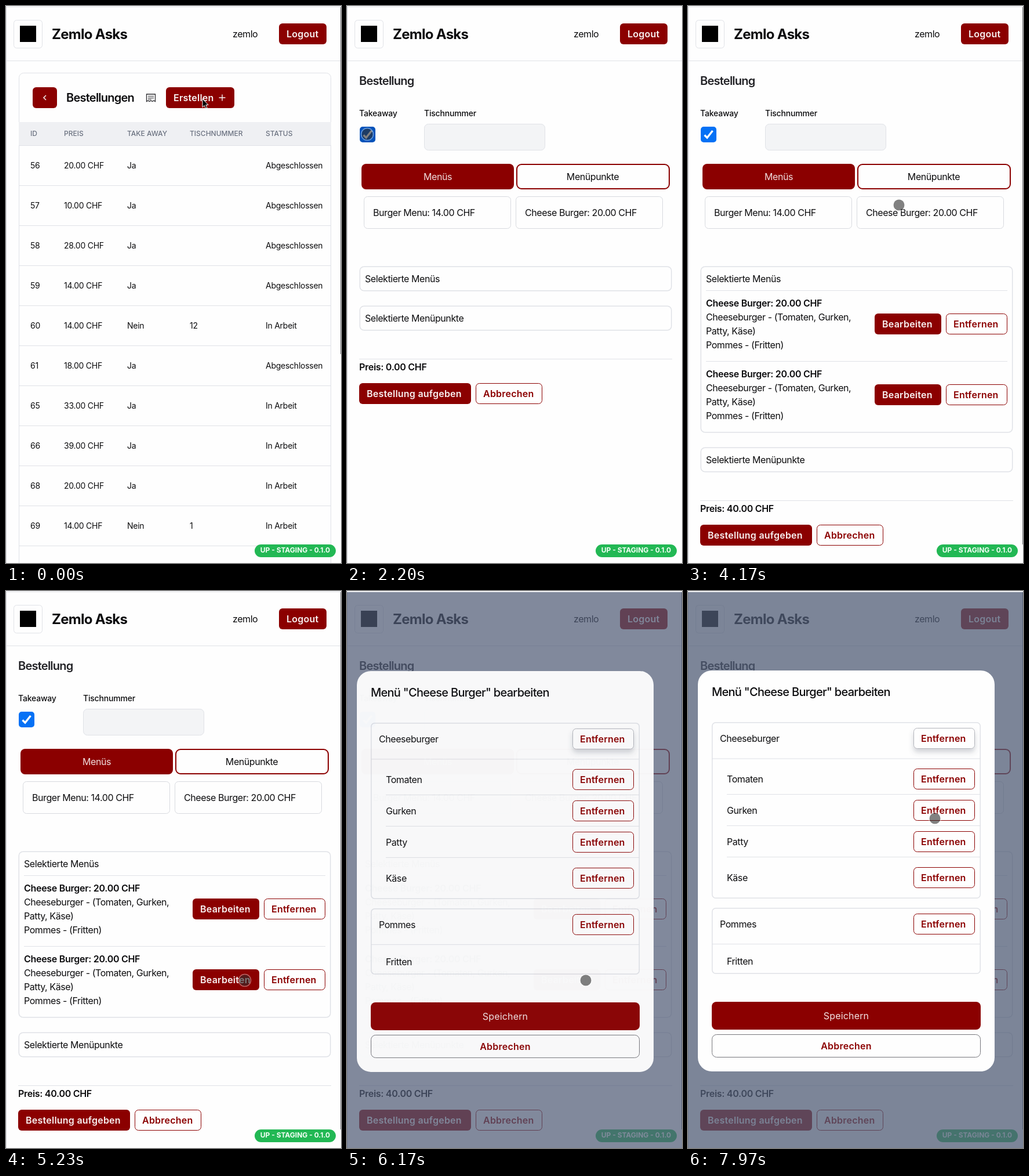
Animation, 578 px wide and 960 px high, one loop 8000 ms. Source, as an HTML page:

```html
<!DOCTYPE html>
<html lang="de">
<head>
<meta charset="utf-8">
<title>Bestellung</title>
<style>
  html, body { margin: 0; width: 100%; height: 100%; overflow: hidden; background: #fefefe; }
  svg { display: block; width: 100vw; height: 100vh; }
  text { font: 400 16px Inter, sans-serif; letter-spacing: -.027em; fill: #0c0c0e; }
  .strong { font-weight: 600; letter-spacing: -.018em; }
  .button { font-weight: 600; letter-spacing: .015em; }
  .brand { font-size: 24px; font-weight: 700; letter-spacing: -.03em; }
  .title { font-size: 20px; font-weight: 600; letter-spacing: -.038em; }
  .dialog { font-size: 20px; font-weight: 500; letter-spacing: -.036em; }
  .label { font-size: 14px; font-weight: 500; letter-spacing: -.014em; }
  .cell { font-size: 14px; letter-spacing: -.018em; }
  .head { font-size: 12px; font-weight: 500; letter-spacing: 0; fill: #6b7280; }
  .badge { font-size: 12px; font-weight: 700; letter-spacing: 0; }
  .save { letter-spacing: .01em; }
</style>
</head>
<body>
<svg id="stage" viewBox="0 0 578 960" preserveAspectRatio="none"></svg>
<script>
const LOOP = 8000;
const RED = '#8b0000', PAGE = '#fefefe', LINE = '#e0e2e7', EDGE = '#d8dadf', PALE = '#f8f2f2';

// Building blocks; boxes are given by their outer edges.
const text = (x, y, str, cls = '', fill = '', anchor = 'start') =>
  `<text x="${x}" y="${y}" class="${cls}" text-anchor="${anchor}"${fill && ` style="fill:${fill}"`}>${str}</text>`;
const box = (x, y, w, h, r, fill, stroke = 'none', sw = 1, extra = '') => {
  const d = stroke === 'none' ? 0 : sw / 2;
  return `<rect x="${x + d}" y="${y + d}" width="${w - 2 * d}" height="${h - 2 * d}" rx="${r}" fill="${fill}" stroke="${stroke}" stroke-width="${sw}" ${extra}/>`;
};
const rule = (x, y, w) => box(x, y, w, 1, 0, LINE);
const path = (d, stroke, width, extra = '') =>
  `<path d="${d}" fill="none" stroke="${stroke}" stroke-width="${width}" ${extra}/>`;
const group = (id, body) => `<g id="${id}">${body}</g>`;
const solidButton = (x, y, w, str) => box(x, y, w, 36, 6, RED) + text(x + 13, y + 24, str, 'button', PALE);
const outlineButton = (x, y, w, str, stroke = RED, extra = '') =>
  box(x, y, w, 36, 6, PAGE, stroke, 1, extra) + text(x + 13, y + 24, str, 'button', RED);

const header = () =>
  rule(0, 1, 578) + box(0, 1, 1, 959, 0, EDGE) + rule(0, 94, 578) +
  box(13, 24, 50, 49, 5, PAGE, LINE) + box(24, 34, 28, 28, 0, '#000') +
  text(79, 57, 'Zemlo Asks', 'brand') + text(391, 54, 'zemlo') + solidButton(471, 30, 82, 'Logout');

const orders = [
  [56, 20], [57, 10], [58, 28], [59, 14], [60, 14, 12],
  [61, 18], [65, 33], [66, 39], [68, 20], [69, 14, 1]
];

const orderRow = ([id, price, table], i) => {
  const y = 280 + 69 * i;
  const done = id < 62 && !table;
  return text(42, y, id, 'cell') + text(100, y, price + '.00 CHF', 'cell') +
    text(209, y, table ? 'Nein' : 'Ja', 'cell') + text(317, y, table || '', 'cell') +
    text(448, y, done ? 'Abgeschlossen' : 'In Arbeit', 'cell') + rule(22, y + 29, 539);
};

const receipt = () =>
  path('M242.5 152H257.5V164.5L255 163L252.5 164.5L250 163L247.5 164.5L245 163L242.5 164.5Z', '#2c2c30', 1.3) +
  path('M245 155.5H255M245 158.5H255M245 161H251', '#2c2c30', 1);

const list = () =>
  box(22, 115, 539, 860, 8, PAGE, LINE) +
  box(46, 140, 42, 36, 6, RED) + path('M69 154L65 158L69 162', PALE, 1.5) +
  text(104, 165, 'Bestellungen', 'title') + receipt() +
  solidButton(276, 140, 118, 'Erstellen') + path('M367.5 158H378.5M373 152.5V163.5', PALE, 1.4) +
  box(22, 200, 539, 40, 0, '#eff0f3') + rule(22, 240, 539) +
  [[42, 'ID'], [100, 'PREIS'], [209, 'TAKE AWAY'], [317, 'TISCHNUMMER'], [448, 'STATUS']]
    .map(([x, str]) => text(x, 224, str, 'head')).join('') +
  orders.map(orderRow).join('') +
  box(577, 2, 1, 598, 0, '#77777a');

const selectedMenu = i => group('item' + i, `<g transform="translate(0 ${122 * i})">` +
  rule(31, 490, 520) + text(31, 518, 'Cheese Burger: 20.00 CHF', 'strong') +
  ['Cheeseburger - (Tomaten, Gurken,', 'Patty, Käse)', 'Pommes - (Fritten)']
    .map((str, k) => text(31, 542 + 24 * k, str)).join('') +
  solidButton(322, 530, 115, 'Bearbeiten') + outlineButton(445, 530, 106, 'Entfernen') + '</g>');

const form = () =>
  text(21, 136, 'Bestellung', 'title', '#222226') +
  text(21, 190, 'Takeaway', 'label') + text(133, 190, 'Tischnummer', 'label') +
  box(22, 208, 27, 27, 4, PAGE, '#707074', 2, 'id="check"') +
  path('M28.5 222.5L33 227L42.5 215', '#fff', 3.4, 'id="tick"') +
  box(133, 203, 209, 46, 7, PAGE, LINE, 1, 'id="tableInput"') +
  box(25, 272, 263, 44, 8, RED) + text(156.5, 300, 'Menüs', '', '#f0dede', 'middle') +
  box(292, 272, 265, 44, 8, PAGE, RED, 2) + text(424, 300, 'Menüpunkte', '', '', 'middle') +
  box(29, 328, 254, 56, 6, PAGE, EDGE) + text(45, 362, 'Burger Menu: 14.00 CHF') +
  box(291, 328, 254, 56, 6, PAGE, EDGE) + text(307, 362, 'Cheese Burger: 20.00 CHF') +
  box(21.5, 448.5, 539, 43, 7, PAGE, LINE, 1.5, 'id="menuBox"') + text(31, 476, 'Selektierte Menüs') +
  selectedMenu(0) + selectedMenu(1) +
  group('lower',
    box(21.5, 516.5, 539, 43, 7, PAGE, LINE, 1.5) + text(31, 544, 'Selektierte Menüpunkte') +
    rule(21, 608, 540) + `<text id="price" x="21" y="628" class="strong"></text>` +
    solidButton(21, 650, 193, 'Bestellung aufgeben') + outlineButton(222, 650, 115, 'Abbrechen')) +
  box(577, 2, 1, 926, 0, '#77777a', 'none', 1, 'id="scrollbar"');

const ingredient = (str, y, line) =>
  text(67, y, str) + outlineButton(389, y - 24, 106, 'Entfernen') + (line ? rule(67, y + 20, 437) : '');

const modal = () =>
  box(17, 137, 512, 691, 24, PAGE) +
  text(41, 181, 'Menü "Cheese Burger" bearbeiten', 'dialog') +
  box(41, 226, 464, 304, 6, 'none', LINE, 1.5) + text(55, 260, 'Cheeseburger') +
  outlineButton(389, 236, 106, 'Entfernen', '#b4b6bc', 'filter="url(#lift)"') + rule(41, 288.5, 464) +
  ingredient('Tomaten', 330, true) + ingredient('Gurken', 384, true) +
  ingredient('Patty', 438, true) + ingredient('Käse', 500, false) +
  box(41, 546, 464, 114, 6, 'none', LINE, 1.5) + text(55, 580, 'Pommes') +
  outlineButton(389, 556, 106, 'Entfernen') + rule(41, 608, 464) + text(67, 644, 'Fritten') +
  box(41, 708, 464, 48, 8, RED) + text(273, 738, 'Speichern', 'save', '#f3e4e4', 'middle') +
  box(41, 764, 464, 40, 8, PAGE, '#76767c') + text(273, 790, 'Abbrechen', 'button', RED, 'middle');

const $ = id => document.getElementById(id);

$('stage').innerHTML =
  `<defs><filter id="lift" x="-20%" y="-40%" width="140%" height="220%">
    <feDropShadow dx="0" dy="6" stdDeviation="4" flood-color="#505468" flood-opacity=".25"/></filter></defs>` +
  box(0, 0, 578, 960, 0, PAGE) + header() + group('list', list()) + group('form', form()) +
  box(429, 928, 140, 22, 11, '#22b854') + text(499, 942, 'UP - STAGING - 0.1.0', 'badge', '#f4fff6', 'middle') +
  box(0, 2, 578, 958, 0, 'rgb(80,92,118)', 'none', 1, 'id="backdrop"') + group('modal', modal()) +
  group('touch', `<circle r="9.5" fill="rgba(45,45,45,.6)"/><circle r="10.5" fill="none" stroke="rgba(255,255,255,.4)" stroke-width="1.5"/>`) +
  `<path id="arrow" d="M339 160V174.500L342.300 171.500L344.500 176.500L347 175.500L344.800 170.500H349Z" fill="#000" stroke="#fff"/>`;

// Moments of the interaction in ms.
const TOUCH_ON = 100, OPEN_FORM = 600, CHECK = 2050, ADD = [3450, 3900], OPEN_MODAL = 5902;
const stops = [
  [0, 339, 162], [1250, 339, 162], [1900, 35, 221], [2450, 35, 221], [3080, 364, 343],
  [4250, 364, 343], [4950, 412, 671], [6800, 412, 671], [7480, 426, 392], [LOOP, 426, 392]
];

const clamp = v => Math.min(1, Math.max(0, v));
const mix = (a, b, u) => a + (b - a) * u;
const smooth = u => u * u * (3 - 2 * u);
const show = (id, on) => $(id).setAttribute('display', on ? 'inline' : 'none');
const set = (id, attrs) => Object.entries(attrs).forEach(([k, v]) => $(id).setAttribute(k, v));

function touchAt(t) {
  const i = Math.max(1, stops.findIndex(s => s[0] > t));
  const [a, b] = [stops[i - 1], stops[i]];
  const u = smooth(clamp((t - a[0]) / (b[0] - a[0])));
  return [mix(a[1], b[1], u), mix(a[2], b[2], u)];
}

function render(t) {
  show('list', t < OPEN_FORM);
  show('form', t >= OPEN_FORM);
  show('arrow', t < TOUCH_ON);
  show('touch', t >= TOUCH_ON);
  set('touch', { transform: `translate(${touchAt(t)})` });

  const checked = t >= CHECK;
  const blue = t < ADD[0] ? '#0553ba' : '#0571f5';
  set('check', { fill: checked ? blue : PAGE, stroke: checked ? blue : '#707074' });
  show('tick', checked);
  set('tableInput', { fill: checked ? '#f3f4f6' : PAGE });

  const count = ADD.filter(at => t >= at).length;
  ADD.forEach((_, i) => show('item' + i, i < count));
  set('menuBox', { height: 41.5 + 122 * count });
  set('lower', { transform: `translate(0 ${122 * count})` });
  $('price').textContent = `Preis: ${20 * count}.00 CHF`;
  show('scrollbar', count === 2);

  const p = 1 - (1 - clamp((t - OPEN_MODAL) / 424)) ** 3;
  show('modal', p > 0);
  set('modal', { opacity: p, transform: `translate(0 ${18 * (1 - p)})` });
  set('backdrop', { opacity: .75 * p });
}

function tick() {
  render(performance.now() % LOOP);
  requestAnimationFrame(tick);
}
tick();
</script>
</body>
</html>
```
